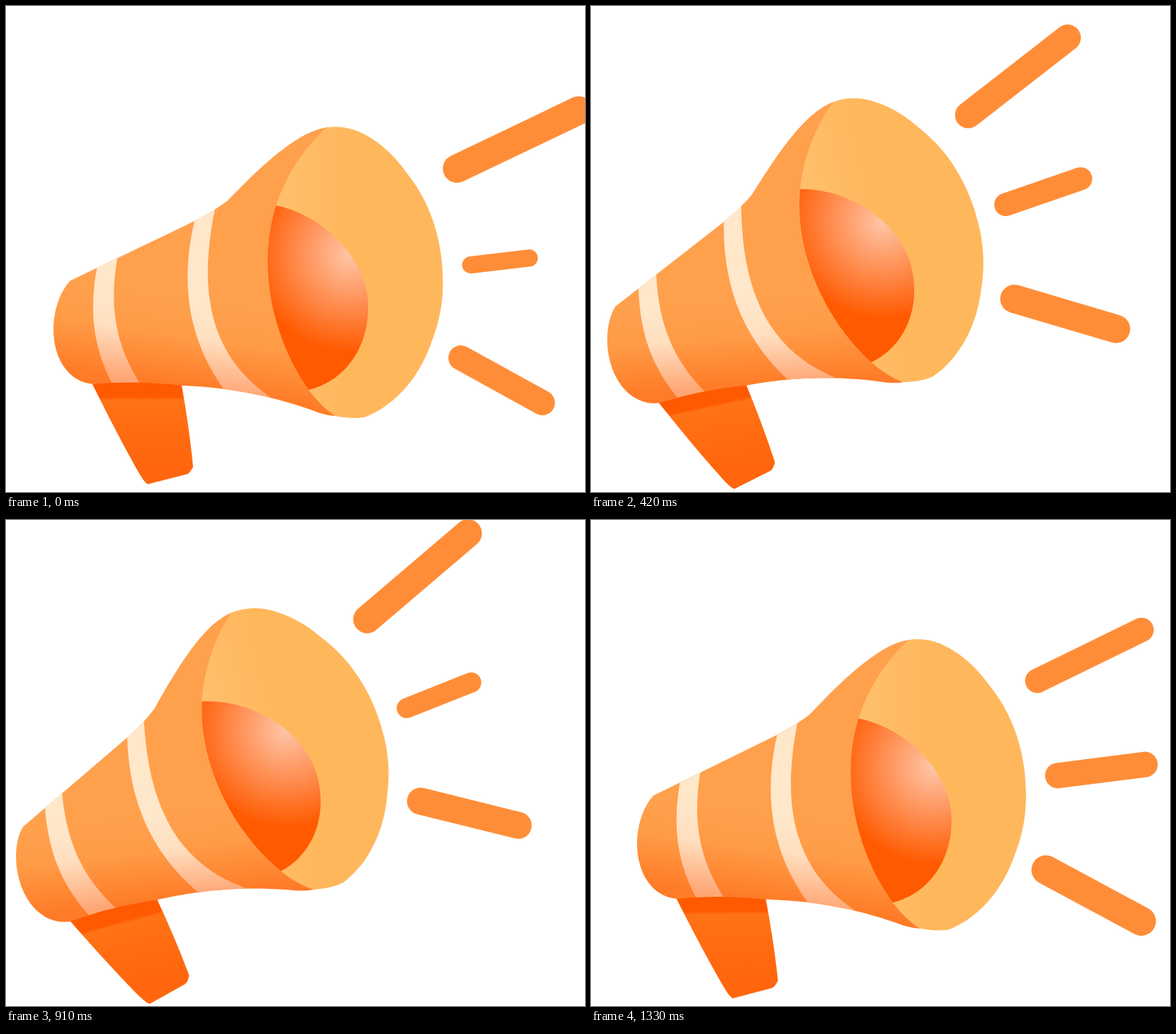
Recreate the animation shown at these times as an HTML page. Size 817x685 px, loop 1400 ms.

```html
<!DOCTYPE html>
<html lang="en">
<head>
<meta charset="utf-8">
<title>Megaphone</title>
<style>
  html, body { margin: 0; width: 100%; height: 100%; overflow: hidden; background: #fff; }
  svg { display: block; width: 100vw; height: 100vh; }
</style>
</head>
<body>
<svg viewBox="0 0 817 685">
  <defs>
    <linearGradient id="bodyFill" gradientUnits="userSpaceOnUse" x1="300" y1="425" x2="283" y2="542">
      <stop offset="0" stop-color="#ffa04d"/>
      <stop offset=".4" stop-color="#ff9b46"/>
      <stop offset="1" stop-color="#ff7b27"/>
    </linearGradient>
    <linearGradient id="stripeFill" href="#bodyFill" gradientUnits="userSpaceOnUse" x1="300" y1="425" x2="283" y2="542">
      <stop offset="0" stop-color="#ffe7ca"/>
      <stop offset=".4" stop-color="#ffdfc0"/>
      <stop offset="1" stop-color="#ffa674"/>
    </linearGradient>
    <linearGradient id="rimFill" gradientUnits="userSpaceOnUse" x1="380" y1="0" x2="480" y2="0">
      <stop offset="0" stop-color="#ffc06c"/>
      <stop offset="1" stop-color="#ffb75c"/>
    </linearGradient>
    <radialGradient id="throatFill" gradientUnits="userSpaceOnUse" cx="486" cy="350" r="138">
      <stop offset="0" stop-color="#ffc6a9"/>
      <stop offset="1" stop-color="#ff5a00"/>
    </radialGradient>
    <linearGradient id="gripFill" gradientUnits="userSpaceOnUse" x1="0" y1="533" x2="0" y2="640">
      <stop offset=".17" stop-color="#ff5a00"/>
      <stop offset=".21" stop-color="#ff7216"/>
      <stop offset="1" stop-color="#ff660e"/>
    </linearGradient>
    <clipPath id="inBody"><use href="#body"/></clipPath>
    <clipPath id="inRim"><use href="#rim"/></clipPath>
  </defs>
  <g id="horn">
    <path fill="url(#gripFill)" d="M115 519L122 533C146 582 174 635 190 662Q196 672 200 674L255 660Q258 659 260 656L264 650Q259 597 248 535L246 519Z"/>
    <path id="body" fill="url(#bodyFill)" d="M123 533C88 530 67 497 67 456C67 428 77 401 91 387L262 305
      C282 295 299 285 313 274C348 238 382 205 415 185.5C428 178 440 173 453 171L465 578
      Q449 577 430 569C370 548 310 537 248 535C205 530 163 529 123 533Z"/>
    <g fill="url(#stripeFill)" clip-path="url(#inBody)">
      <path d="M130 360C117 425 120 480 155 542H196C148 475 146 410 159 345Z"/>
      <path d="M268 295C250 365 244 460 316 552L377 554C277 488 273 385 297 276Z"/>
    </g>
    <path id="rim" fill="url(#rimFill)" d="M453 171C472 168.5 490 172 508 182C530 194 550 213 566 236
      C600 278 616.5 332 616.5 390C616.5 420 611 447 601 472C585 520 552 561 508 579C497 582 481 581 465 578
      C451 569 439 557 427 541C392 492 372 430 369.5 372C368 340 372 310 381 281C394 242 418 202 453 171Z"/>
    <path fill="url(#throatFill)" clip-path="url(#inRim)" d="M340 277L381 281C452 296 511 360 511 425C511 482 478 529 427 541L340 560Z"/>
    <g id="rays" stroke="#ff8d38" stroke-linecap="round"></g>
  </g>
</svg>
<script>
const LOOP = 1400, STEP = 70, PULSE = LOOP / 3, SWING = 19.05;
const $ = id => document.getElementById(id);
const ease = x => x * x * (3 - 2 * x);
const wrap = x => ((x % 1) + 1) % 1;

// x, y: fixed point; thick: radius per length; lead: start offset in radii;
// fall, low, high: phases where shrinking, the trough and the peak begin.
const rays = [
  { x: 618.3, y: 237.8, turn: -25.5, max: 190.5, min: 70, thick: .105, lead: 1, fall: 0, low: .508, high: 1 },
  { x: 643.7, y: 366.3, turn: -6.7, max: 137, min: 47, thick: .145, lead: 1, fall: .74, low: .2, high: .655 },
  { x: 631, y: 490, turn: 28.8, max: 153, min: 44, thick: .134, lead: .7, fall: .84, low: .4, high: .76 }
];
for (const r of rays)
  r.el = $('rays').appendChild(document.createElementNS('http://www.w3.org/2000/svg', 'line'));

function size(r, phase) {
  const rise = wrap(phase - r.low), riseSpan = wrap(r.high - r.low);
  const drop = wrap(phase - r.fall), dropSpan = wrap(r.low - r.fall);
  const k = drop < dropSpan ? 1 - ease(drop / dropSpan)
          : rise < riseSpan ? ease(rise / riseSpan) : 1;
  return r.min + (r.max - r.min) * k;
}

function draw(t) {
  const u = t / (LOOP / 2);
  const angle = SWING * ease(u < 1 ? u : 2 - u);
  $('horn').setAttribute('transform', `rotate(${-angle} 232 667)`);
  for (const r of rays) {
    const len = size(r, wrap(t / PULSE)), rad = len * r.thick, from = rad * r.lead;
    const at = { x1: from, x2: from + len, 'stroke-width': rad * 2,
                 transform: `translate(${r.x} ${r.y}) rotate(${r.turn})` };
    for (const k in at) r.el.setAttribute(k, at[k]);
  }
}

const start = performance.now();
function tick() {
  const t = (performance.now() - start) % LOOP;
  draw(Math.floor(t / STEP) * STEP);
  requestAnimationFrame(tick);
}
tick();
</script>
</body>
</html>
```
